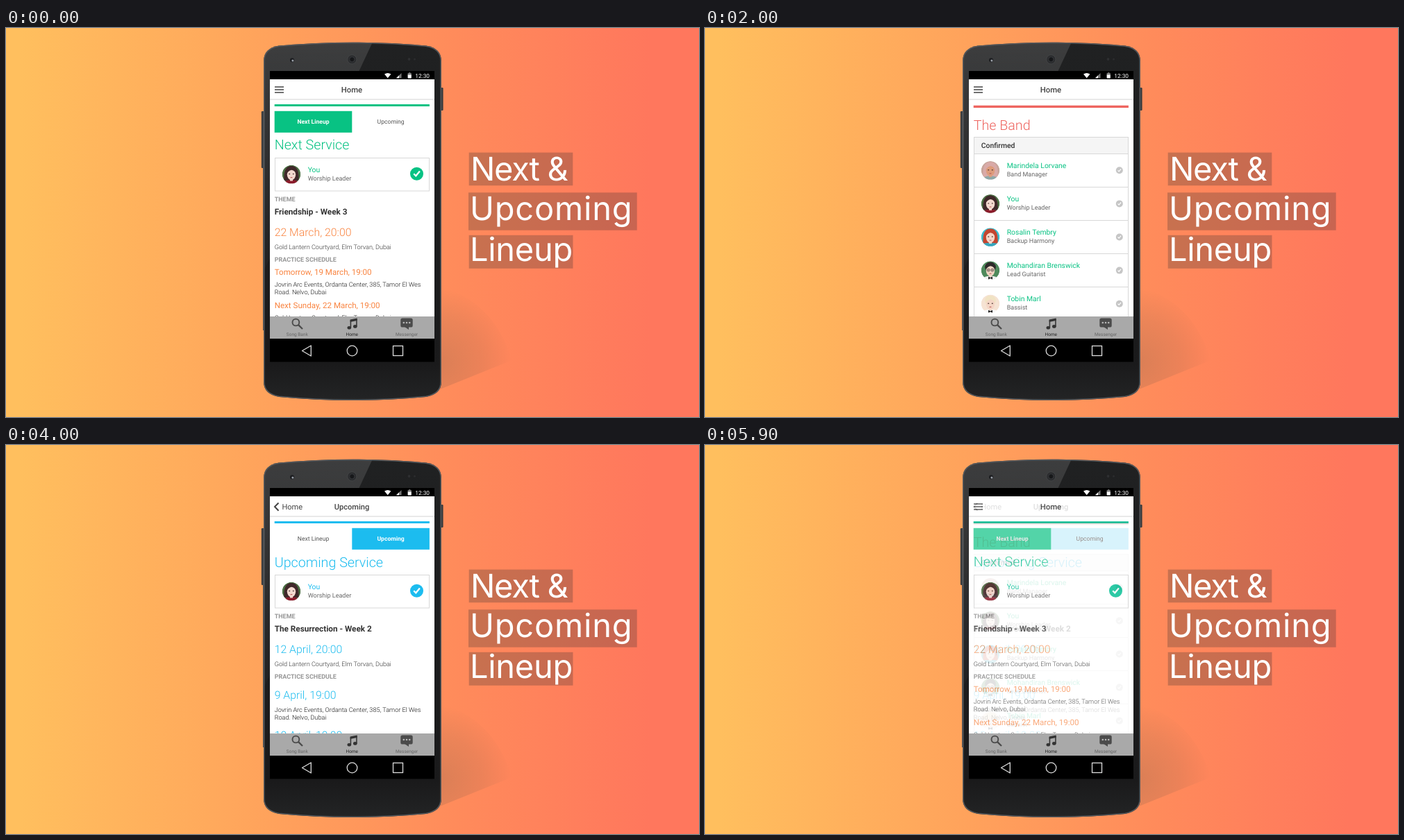
These frames come from a looping animation (998x561 px, 6000 ms). An HTML page:

```html
<!DOCTYPE html>
<html lang="en">
<head>
<meta charset="utf-8">
<title>Next and upcoming lineup</title>
<style>
html, body { margin: 0; width: 100%; height: 100%; overflow: hidden; background: #ff9a5c; }
svg { display: block; width: 998px; height: 561px; text-rendering: geometricPrecision; }
text { font-family: Roboto, "Noto Sans", sans-serif; white-space: pre; }
.caption text { font: 400 47px Inter, "Open Sans", sans-serif; fill: #fff; }

/* Screens are stacked: band at the bottom, next above it, upcoming on top. */
.next { animation: next 6s infinite; }
.upcoming { animation: upcoming 6s infinite; }
@keyframes next {
  0% { opacity: 1; animation-timing-function: step-end; }
  25% { opacity: 1; animation-timing-function: steps(6, start); }
  35% { opacity: 0; animation-timing-function: step-end; }
  91.6666% { opacity: 0; animation-timing-function: steps(5, start); }
  100% { opacity: .8333; }
}
@keyframes upcoming {
  0% { opacity: 0; animation-timing-function: step-end; }
  58.3333% { opacity: 0; animation-timing-function: steps(6, start); }
  68.3333% { opacity: 1; animation-timing-function: step-end; }
  91.6666% { opacity: 1; animation-timing-function: steps(5, start); }
  100% { opacity: .1667; }
}
</style>
</head>
<body>
<svg id="stage" viewBox="0 0 998 561" xmlns="http://www.w3.org/2000/svg"></svg>
<script>
const GREEN = '#08c283', BLUE = '#1cbcef', RED = '#ee6560', ORANGE = '#f98440';
const DARK = '#333', GREY = '#666', PALE = '#979797';
const LEFT = 386.7;

const text = (x, y, size, fill, str, weight = 400, anchor = 'start') =>
  `<text x="${x}" y="${y}" font-size="${size}" fill="${fill}" font-weight="${weight}" text-anchor="${anchor}">${str}</text>`;
const rect = (x, y, w, h, fill, extra = '') =>
  `<rect x="${x}" y="${y}" width="${w}" height="${h}" fill="${fill}" ${extra}/>`;
const circle = (x, y, r, fill, extra = '') =>
  `<circle cx="${x}" cy="${y}" r="${r}" fill="${fill}" ${extra}/>`;
const ellipse = (x, y, rx, ry, fill) =>
  `<ellipse cx="${x}" cy="${y}" rx="${rx}" ry="${ry}" fill="${fill}"/>`;
const path = (d, fill, extra = '') => `<path d="${d}" fill="${fill}" ${extra}/>`;
const line = (d, color, width, extra = '') =>
  path(d, 'none', `stroke="${color}" stroke-width="${width}" ${extra}`);

const looks = {
  manager: { bg: '#c7a59b', hair: '#d9aaa8', skin: '#dd9c7c', top: '#8fa8a8', long: true },
  you: { bg: '#4c7044', hair: '#40282a', skin: '#f3d9cf', top: '#8c1c2c', long: true },
  harmony: { bg: '#3dbccd', hair: '#c4452f', skin: '#f6d6c8', top: '#37a6bd', long: true },
  guitar: { bg: '#4f8a5c', hair: '#2e2a2a', skin: '#f1d6c4', top: '#f4f4f4', glasses: true, tie: true },
  bass: { bg: '#f6e3d3', hair: '#f1e3c4', skin: '#f4d6c6', top: '#fafafa', tie: true }
};

function avatar(x, y, look) {
  const { bg, hair, skin, top, long, glasses, tie } = look;
  const eyes = [-2.8, 2.8];
  return `<g transform="translate(${x} ${y})" clip-path="url(#disc)">` +
    circle(0, 0, 13.3, bg) +
    (long ? path('M-10.5 9Q-12 -12 0 -12Q12 -12 10.5 9Z', hair) : ellipse(0, -5, 8, 7, hair)) +
    path('M-12 14Q-11 8.5 0 8Q11 8.5 12 14Z', top) +
    rect(-2, 4, 4, 5.5, skin) +
    ellipse(0, .3, 6.2, 8, skin) +
    path('M-6.8 -1Q-6.5 -9.5 1 -9.5Q6.5 -8.5 6.8 -1Q4.5 -6 0 -6.3Q-4.5 -5 -6.8 -1Z', hair) +
    eyes.map(e => ellipse(e, -.5, 1.1, .7, '#4a3430')).join('') +
    (glasses ? eyes.map(e => circle(e, -.5, 2, 'none', 'stroke="#333" stroke-width=".7"')).join('') : '') +
    line('M-1.4 4.6H1.4', '#b9504f', 1) +
    (tie ? path('M-3 9L0 10.5L3 9V13L0 11.5L-3 13Z', '#222') : '') +
    '</g>';
}

const tick = (x, y, r, color) => circle(x, y, r, color) +
  line(`M${x - r * .45} ${y}L${x - r * .13} ${y + r * .33}L${x + r * .46} ${y - r * .38}`, '#fff', r * .24);

const person = (y, color, name, role) =>
  text(434.7, y, 10.4, color, name) + text(434.7, y + 12, 9, GREY, role);

const header = () => rect(380, 74, 237, 343, '#fff') + rect(380, 102.5, 237, 1, '#d4d4d4');
const menu = () => line('M387 85H400M387 89H400M387 93H400', '#444', 1.5) +
  text(498, 93, 11.3, '#444', 'Home', 500, 'middle');

const tab = (x, label, color) => (color ? rect(x, 119.8, 111.6, 31, color) : '') +
  text(x + 55.8, 138, 8.6, color ? '#fff' : '#555', label, color ? 700 : 400, 'middle');

const hall = 'Gold Lantern Courtyard, Elm Torvan, Dubai';
const studio = ['Jovrin Arc Events, Ordanta Center, 385, Tamor El Wes', 'Road. Nelvo, Dubai'];
const address = y => studio.map((s, i) => text(LEFT, y + i * 10.7, 9.1, '#111', s, 300)).join('');

// Parts shared by the two service screens.
const service = (color, title, y, theme, date, dateColor) =>
  rect(386.7, 110, 223.2, 3, color) +
  text(LEFT, y, 19.7, color, title, 300) +
  rect(387.5, 187.5, 222, 47.5, '#fff', 'stroke="#d8d8d8"') +
  avatar(411, 211, looks.you) +
  person(208, color, 'You', 'Worship Leader') +
  tick(591.5, 210.2, 9.5, color) +
  text(LEFT, 250, 9, PALE, 'THEME', 700) +
  text(LEFT, 269.3, 11.75, DARK, theme, 700) +
  text(LEFT, 300, 15.8, dateColor, date, 300) +
  text(LEFT, 319, 9.1, DARK, hall, 300) +
  text(LEFT, 336.5, 9, PALE, 'PRACTICE SCHEDULE', 700);

function bandScreen() {
  const members = [
    ['Marindela Lorvane', 'Band Manager', looks.manager],
    ['You', 'Worship Leader', looks.you],
    ['Rosalin Tembry', 'Backup Harmony', looks.harmony],
    ['Mohandiran Brenswick', 'Lead Guitarist', looks.guitar],
    ['Tobin Marl', 'Bassist', looks.bass]
  ];
  const rows = members.map(([name, role, look], i) => {
    const y = 181.3 + i * 48.1;
    return line(`M387 ${Math.floor(y) + .5}H610`, '#d8d8d8', 1) +
      avatar(411, y + 24, look) +
      person(y + 20.7, GREEN, name, role) +
      tick(596.8, y + 24, 5, '#c6c6c6');
  });
  return header() + menu() +
    rect(386.7, 111.7, 223.2, 3.4, RED) +
    text(LEFT, 146.5, 19.7, RED, 'The Band', 300) +
    rect(387.5, 157.5, 222, 280, '#fff', 'stroke="#d8d8d8"') +
    rect(388, 158, 221, 23, '#f5f5f5') +
    text(397.8, 173, 10.4, DARK, 'Confirmed', 500) +
    rows.join('');
}

const nextScreen = () => header() + menu() +
  tab(386.7, 'Next Lineup', GREEN) + tab(498.3, 'Upcoming') +
  service(GREEN, 'Next Service', 175, 'Friendship - Week 3', '22 March, 20:00', ORANGE) +
  text(LEFT, 356, 11.6, ORANGE, 'Tomorrow, 19 March, 19:00') +
  address(373) +
  text(LEFT, 404, 11.6, ORANGE, 'Next Sunday, 22 March, 19:00') +
  text(LEFT, 421, 9.1, '#111', hall, 300);

const upcomingScreen = () => header() +
  line('M392.5 83.5L387 89L392.5 94.8', '#444', 2) +
  text(397.5, 93, 11, '#444', 'Home') +
  text(498, 93, 11.1, '#444', 'Upcoming', 500, 'middle') +
  tab(386.7, 'Next Lineup') + tab(498.3, 'Upcoming', BLUE) +
  service(BLUE, 'Upcoming Service', 176, 'The Resurrection - Week 2', '12 April, 20:00', BLUE) +
  text(LEFT, 365.5, 15.8, BLUE, '9 April, 19:00', 300) +
  address(385) +
  text(LEFT, 424, 15.8, BLUE, '10 April, 19:00', 300);

const body = 'M371 48Q371 29 393 25.5Q499 16 605 25.5Q627 29 627 48V510Q627 528 605 532Q499 542 393 532Q371 528 371 510Z';

const stop = (at, color, alpha = 1) => `<stop offset="${at}" stop-color="${color}" stop-opacity="${alpha}"/>`;
const defs = () => `<defs>
  <linearGradient id="sky">${stop(.02, '#ffbf5e')}${stop(.3, '#ffa95c')}${stop(.65, '#ff8b5b')}${stop(.93, '#ff775d')}</linearGradient>
  <linearGradient id="shell" x2="0" y2="1">${stop(0, '#202122')}${stop(.9, '#1a1a1b')}${stop(1, '#232425')}</linearGradient>
  <linearGradient id="glare" x2="0" y2="1">${stop(0, '#fff', .13)}${stop(1, '#fff', .02)}</linearGradient>
  <radialGradient id="shade" gradientUnits="userSpaceOnUse" cx="622" cy="482" r="106">${stop(0, '#7a5a48', .28)}${stop(.6, '#7a5a48', .14)}${stop(1, '#7a5a48', 0)}</radialGradient>
  <clipPath id="disc"><circle r="13.3"/></clipPath>
  <clipPath id="view"><rect x="380" y="74" width="237" height="343"/></clipPath>
  <clipPath id="case"><path d="${body}"/></clipPath>
</defs>`;

// The rim is stroked inside the case, so the outline keeps its size.
const phone = () =>
  path('M620 372Q700 390 729 479L625 521Z', 'url(#shade)') +
  rect(367.8, 120, 5, 82, '#3b3d3f', 'rx="1.2"') +
  rect(370, 120, 2, 316, '#4a4c4f') +
  rect(625, 86, 4.6, 33, '#3b3d3f', 'rx="1.2"') +
  path(body, 'url(#shell)') +
  `<g clip-path="url(#case)">${path('M371 18H529L508 63L381 330L371 350Z', 'url(#glare)')}` +
  line(body, '#55585b', 3) + '</g>' +
  circle(498.3, 45.3, 6.6, '#2b2c2e', 'stroke="#47494b" stroke-width=".8"') +
  circle(498.3, 45.3, 3.6, '#17181a', 'stroke="#3c3e42" stroke-width=".8"') +
  circle(412, 46.2, 3, '#1c1d20') +
  circle(412.9, 47, 1.5, '#9aa0a8') +
  circle(580.5, 45, 1.9, '#2e2f31') + circle(588.5, 45, 1.6, '#2b2c2e') +
  rect(380, 62, 237, 419.5, '#000');

const statusBar = () =>
  path('M545 66.4Q549.7 63.4 554.4 66.4L549.7 72.2Z', '#fff') +
  path('M562 72.2L569.5 65V72.2Z', '#777') + path('M562 72.2L566 68.4V72.2Z', '#fff') +
  rect(580, 64.3, 2.4, 1.5, '#999') + rect(578.6, 65.2, 5.2, 3, '#888') + rect(578.6, 67.6, 5.2, 4.9, '#fff') +
  text(610, 71.8, 8.3, '#fff', '12:30', 400, 'end');

const label = (x, str, color) => text(x, 444.3, 6.5, color, str, 400, 'middle');
const tabBar = () => rect(380, 416, 237, 32, '#a9a9a9') +
  circle(417.4, 424.5, 4.9, 'none', 'stroke="#4b4b4b" stroke-width="1.9"') +
  line('M421 428.2L427 434', '#4b4b4b', 2.3) +
  ellipse(494.3, 432.2, 2.8, 2.3, '#333') + ellipse(502.8, 430.4, 2.8, 2.3, '#333') +
  line('M496.4 432V421M504.9 430.4V419.5', '#333', 1.5) +
  path('M495.7 420.6L505.6 418.6V422L495.7 424Z', '#333') +
  rect(568.3, 418.4, 17.4, 13.2, '#4b4b4b', 'rx="2.6"') +
  path('M574 431L580 435V431Z', '#4b4b4b') +
  [572.8, 577, 581.2].map(x => circle(x, 425, 1.35, '#b5b5b5')).join('') +
  label(419.3, 'Song Bank', '#666') + label(498.3, 'Home', '#222') + label(577, 'Messenger', '#666');

const navKeys = () => {
  const pen = 'stroke="#dcdcdc" stroke-width="1.3"';
  return path('M426.5 465.5L439.3 458V473Z', 'none', pen + ' stroke-linejoin="round"') +
    circle(498.5, 465.5, 7.3, 'none', pen) +
    rect(557.5, 458.5, 14, 14, 'none', pen);
};

const plate = (x, y, w, h) => rect(x, y, w, h, '#3c3232', 'fill-opacity=".28"');
const caption = () => '<g class="caption">' +
  plate(666.7, 179.6, 149.6, 47.6) + plate(666, 237.3, 242.7, 54.4) + plate(666.7, 298.8, 149.8, 48) +
  '<text x="669" y="220" letter-spacing="-1.3">Next &amp;</text>' +
  '<text x="668" y="277" letter-spacing=".8">Upcoming</text>' +
  '<text x="668" y="336" letter-spacing="-.3">Lineup</text></g>';

document.getElementById('stage').innerHTML = defs() +
  rect(0, 0, 998, 561, 'url(#sky)') +
  phone() + statusBar() +
  `<g clip-path="url(#view)"><g>${bandScreen()}</g>` +
  `<g class="next">${nextScreen()}</g><g class="upcoming">${upcomingScreen()}</g></g>` +
  tabBar() + navKeys() + caption();
</script>
</body>
</html>
```
